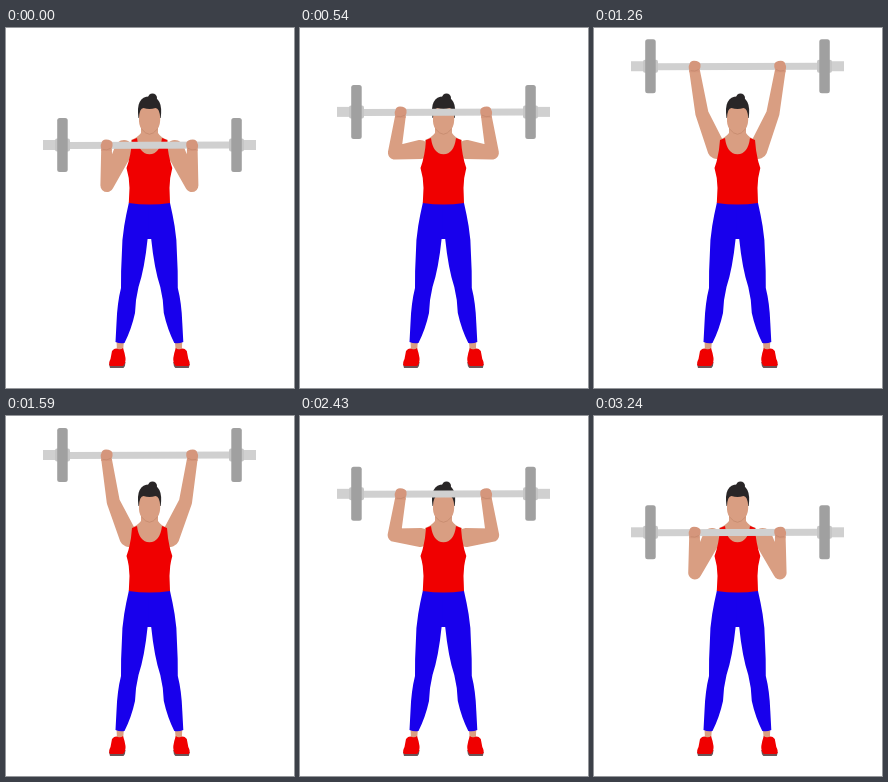
An HTML page that plays this animation: 288x360 px, repeating every 3270 ms.

```html
<!DOCTYPE html>
<html lang="en">
<head>
<meta charset="utf-8">
<title>Overhead press</title>
<style>
  html, body { margin: 0; width: 100%; height: 100%; overflow: hidden; background: #fff; }
  svg { display: block; width: 288px; height: 360px; }
  .skin { fill: #d99e82; }
  .fist { fill: #d5967c; }
  .red { fill: #f00000; }
  .blue { fill: #1800ec; }
  .hair { fill: #292627; }
  .steel { fill: #d0d0d0; }
  .collar { fill: #c6c6c6; }
  .plate { fill: #a0a0a0; }
  .crease { fill: none; stroke: #c58a6e; stroke-width: .8; stroke-linecap: round; }
</style>
</head>
<body>
<svg viewBox="0 0 288 360">
  <defs>
    <g id="leg">
      <path class="skin" d="M110.500 312H118L117 324H111Z"/>
      <path d="M103 336L104 340H117.500Q119.500 338 119.500 334Z" fill="#6b5558"/>
      <path class="red" d="M106 323Q109 319.500 112 321Q115 322 117 320Q118.500 324 119.500 330Q120 335 117 338H104Q102 335.500 104.500 331Z"/>
      <path class="blue" d="M144.500 174H123Q120 187 118.200 198Q115.800 212 115.800 227Q114.800 243 115 260Q111.200 275 110.500 295L109.500 314Q114 316 118.500 315Q125.500 301 129 285Q129.500 271 132.500 259Q138.500 241 141.600 211H144.500Z"/>
    </g>
    <g id="weight">
      <rect class="steel" x="37" y="-5" width="16" height="10"/>
      <rect class="collar" x="49" y="-6.500" width="15" height="13" rx="2"/>
      <rect class="plate" x="51.200" y="-27" width="10.500" height="54" rx="2.500"/>
    </g>
    <g id="fist">
      <path class="fist" d="M95.500 -2Q96 -5.500 100 -5.500Q105.500 -5.500 106.500 -2Q107 1 105.500 4V6H95.300V4Q94 0 95.500 -2Z"/>
      <path class="crease" d="M97 4.500Q101 5.800 104.500 3.500"/>
    </g>
    <path id="arm" class="skin"/>
  </defs>

  <use href="#leg"/>
  <use href="#leg" transform="matrix(-1 0 0 1 286.800 0)"/>

  <path class="skin" d="M135 98V105Q131 110 125 112L123 138H164L162 112Q155 110 152 105V98Z"/>
  <use href="#arm"/>
  <use href="#arm" transform="matrix(-1 0 0 1 286.800 0)"/>
  <path class="red" d="M126 112L131 110Q133 126 143.500 126.300Q154 126 156 110L161 112Q162 128 166.300 140Q163.500 150 163.500 160L164 175Q143.500 178 122.800 175L123.500 160Q123.500 150 120.500 140Q125 128 126 112Z"/>

  <circle class="hair" cx="146.500" cy="70" r="4.500"/>
  <path class="hair" d="M132.500 90Q129.500 68.500 143.500 68.500Q157.500 68.500 154.700 90Z"/>
  <path class="skin" d="M133 90Q133.500 80 137.500 80Q143.500 82 149.500 80Q153.500 80 154.200 90Q154.500 97 151.500 101Q147 106.300 143.500 106.300Q140 106.300 135.500 101Q132.500 97 133 90Z"/>
  <path class="crease" d="M135.500 101Q140 106.300 143.500 106.300Q147 106.300 151.500 101"/>

  <g id="barbell">
    <path class="steel" d="M60 -3L227 -3.500V3.500L60 4Z"/>
    <use href="#weight"/>
    <use href="#weight" transform="matrix(-1 0 0 1 287 0)"/>
    <use href="#fist"/>
    <use href="#fist" transform="matrix(-1 0 0 1 286.800 0)"/>
  </g>
</svg>
<script>
  const LOOP = 3270, PEAK = 1380, STEP = 30;
  const LOW = 117, TRAVEL = 80;

  const arm = document.getElementById('arm');
  const barbell = document.getElementById('barbell');

  // Leaves the chest briskly and settles softly at the top
  function ease(p) {
    const inOut = (1 - Math.cos(Math.PI * p)) / 2;
    const out = Math.sin(Math.PI * p / 2);
    return (2 * inOut + out) / 3;
  }

  // Tapered limb with round ends, from joint a to joint b
  function limb(a, b) {
    const len = Math.hypot(b.x - a.x, b.y - a.y);
    const nx = (a.y - b.y) / len, ny = (b.x - a.x) / len;
    const edge = (j, side) => `${j.x + side * j.r * nx} ${j.y + side * j.r * ny}`;
    const cap = (j, side) => `A${j.r} ${j.r} 0 0 0 ${edge(j, side)}`;
    return `M${edge(a, 1)}L${edge(b, 1)}${cap(b, -1)}L${edge(a, -1)}${cap(a, 1)}Z`;
  }

  function draw(t) {
    const s = ease(t < PEAK ? t / PEAK : (LOOP - t) / (LOOP - PEAK));
    const y = LOW - TRAVEL * s;

    // The elbow swings out, then back in as the arm straightens
    const wrist = { x: 100.5, y: y + 4, r: 5.3 };
    const elbow = { x: 101 - 20.6 * s + 28.5 * s ** 3, y: y + 40.5 + 7 * s ** 3, r: 6.6 };
    const shoulder = { x: 118 + 5 * s, y: 121.5, r: 9.5 };

    barbell.setAttribute('transform', `translate(0 ${y})`);
    arm.setAttribute('d', limb(wrist, elbow) + limb(elbow, shoulder));
  }

  const start = performance.now();
  function tick() {
    const t = (performance.now() - start) % LOOP;
    draw(Math.floor(t / STEP) * STEP);
    requestAnimationFrame(tick);
  }
  tick();
</script>
</body>
</html>
```
